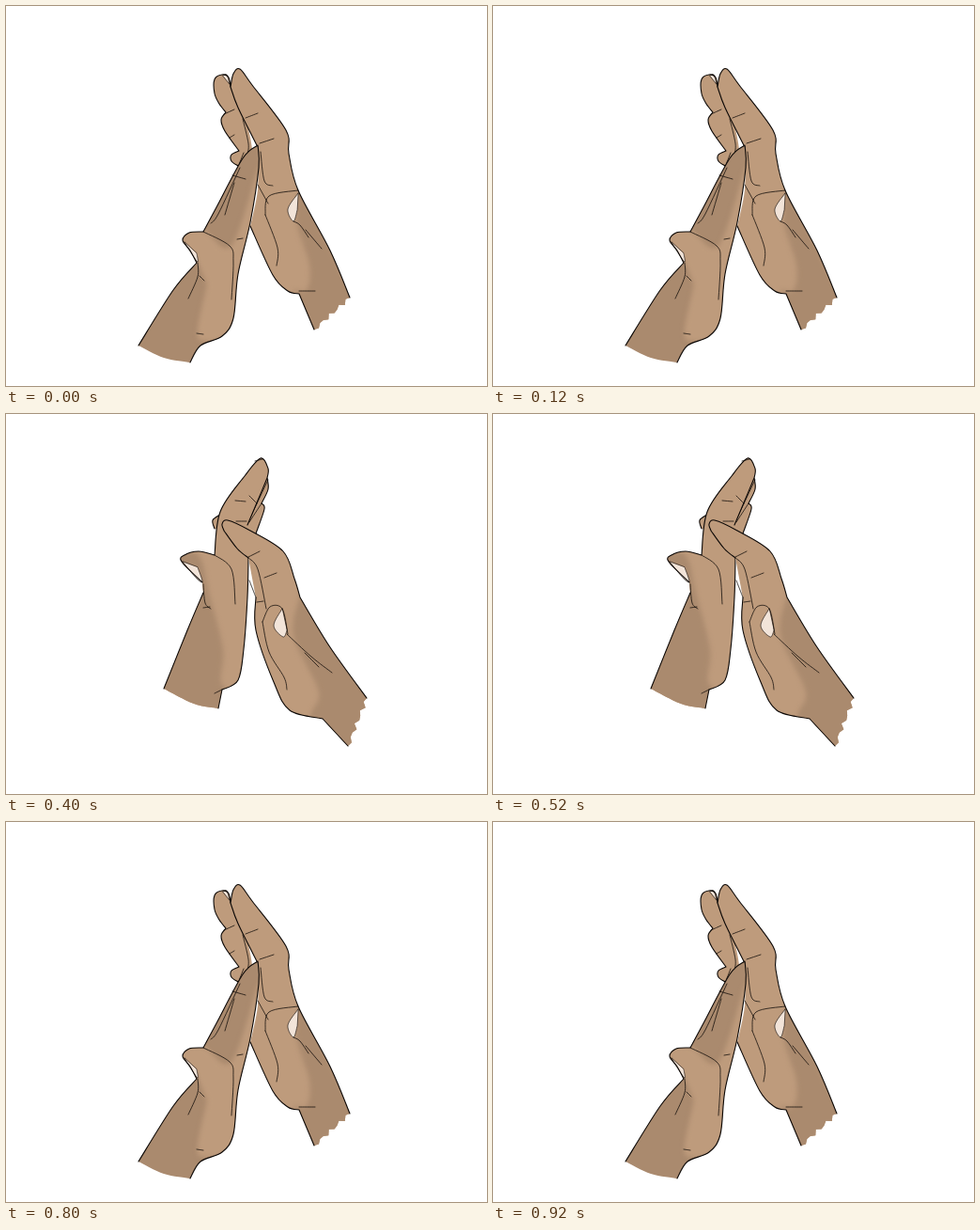
Animation, 512 px wide and 404 px high, one loop 1000 ms. Source, as an HTML page with a canvas:

```html
<!DOCTYPE html>
<html lang="en">
<head>
<meta charset="utf-8">
<title>Clapping hands</title>
<style>
html, body { margin: 0; width: 100%; height: 100%; overflow: hidden; background: #fff }
canvas { display: block; width: 512px; height: 404px }
</style>
</head>
<body>
<canvas width="512" height="404"></canvas>
<script>
const ctx = document.querySelector('canvas').getContext('2d');
const LIGHT = '#be9b7c', DARK = '#aa8a6e', NAIL = '#f2e4d9', INK = '#0c0806';

const points = text => {
  const n = text.match(/\d+/g).map(Number);
  return n.filter((_, i) => i % 2 == 0).map((x, i) => [x, n[2 * i + 1]]);
};

// Smooth curve through the points, continuing the path.
function smooth(path, p) {
  for (let i = 0; i < p.length - 1; i++) {
    const a = p[i - 1] || p[i], b = p[i], c = p[i + 1], d = p[i + 2] || c;
    path.bezierCurveTo(b[0] + (c[0] - a[0]) / 6, b[1] + (c[1] - a[1]) / 6,
      c[0] - (d[0] - b[0]) / 6, c[1] - (d[1] - b[1]) / 6, ...c);
  }
}

function ragged(path, [x, y], [x2, y2]) {
  const dx = x2 - x, dy = y2 - y, len = Math.hypot(dx, dy);
  for (let i = 1; i < 11; i++) {
    const off = 2.5 * Math.sin(i * 2.4);
    path.lineTo(x + dx * i / 11 - dy / len * off, y + dy * i / 11 + dx / len * off);
  }
  path.lineTo(x2, y2);
}

// Runs go on from each other with a corner; "-" is not inked, "~" is a ragged cut.
function outline(text) {
  const fill = new Path2D(), ink = new Path2D();
  let last;
  for (const run of text.split(';')) {
    const p = points(run);
    if (last) p.unshift(last);
    else fill.moveTo(...p[0]);
    if (run.includes('~')) ragged(fill, ...p);
    else {
      smooth(fill, p);
      if (!run.includes('-')) {
        ink.moveTo(...p[0]);
        smooth(ink, p);
      }
    }
    last = p.at(-1);
  }
  fill.closePath();
  return { fill, ink };
}

function strokes(text) {
  const path = new Path2D();
  for (const run of text.split(';')) {
    const p = points(run);
    path.moveTo(...p[0]);
    smooth(path, p);
  }
  return path;
}

const open = [{
  edge: '239 86 237 76 230 73 222 78 222 93 227 104 234 113; 229 121 233 133 248 154; 240 158 240 165 247 170; -262 155 250 100',
  lines: '232 115 243 110; 238 140 243 137; 247 171 253 156',
  nail: '231 74 235 73 238 83'
}, {
  edge: `239 86 242 72 249 67 262 84 298 132 301 157 311 196 345 260 366 310; ~328 344; 312 306;
    300 303 284 286 260 234; -268 195 268 150; 247 108 239 86`,
  shade: '313 190 309 228 323 275 320 302 306 306 328 350 375 320',
  lines: `252 120 258 146 257 158; 270 146 285 141; 255 119 268 114; 271 155 275 186 284 191; 268 190 279 210;
    276 222 280 202 311 196; 276 222 289 257 288 276; 306 229 313 233 322 246; 319 238 336 258; 312 303 329 303`,
  nail: '311 199 300 216 306 229 310 217'
}, {
  edge: `210 240 224 214 252 162 268 148; 269 172 260 230 247 285 242 332 230 351 207 361 196 379;
    -168 374 141 361; 178 302 203 273; 196 260 188 249 195 241 210 240`,
  skin: DARK, tone: LIGHT,
  shade: '205 274 185 247 208 237 240 255 270 170 264 230 248 320 238 350 210 356 204 345 214 296',
  lines: `210 240 238 255 242 272 240 312; 249 172 226 221 218 231; 241 180 255 184; 243 188 233 222;
    204 273 204 288 194 311; 206 287 211 292; 246 248 252 247; 203 348 210 349`,
  nail: '190 251 196 261 204 272 203 263'
}];

const crossed = [{
  edge: '241 77 236 69 226 74 228 87 237 98; 231 102 240 121; -250 122 260 105'
}, {
  edge: `248 111 234 136 218 160; 210 152 195 147 175 153 192 177 195 203; 187 222 142 278; ~184 322;
    204 285 228 275 238 250 246 195 270 138; -289 102; 308 87 311 76 296 76 272 95; -255 100`,
  shade: '165 135 195 145 207 175 212 240 224 290 185 335 125 290',
  lines: `218 160 231 190 229 225 231 236; 195 201 206 202; 231 205 236 203; 231 213 235 212;
    251 158 261 156; 252 161 259 160; 249 172 253 176; 285 94 289 99`,
  nail: '177 159 190 165 193 178'
}, {
  edge: `240 85 242 73 250 71 258 80 296 125 303 165 306 185; 335 236 363 290; ~320 329; 309 300;
    282 292 274 262 265 235; 256 195 262 165 270 140; 262 125 240 85`,
  shade: '308 180 299 230 304 280 300 304 325 340 380 300',
  lines: `256 116 264 118; 270 139 286 134; 258 121 270 139; 270 139 268 170 279 188; 261 168 263 183;
    264 232 274 209 292 204 299 209; 264 232 283 265 284 277; 299 209 304 230 323 255; 309 298 320 300`,
  nail: '298 212 287 231 291 235 298 222'
}];

const raised = [{
  edge: '278 68 279 80 272 95; 275 101 266 127; -222 122; 220 113 228 107',
  lines: '272 95 259 115; 279 70 260 110'
}, {
  edge: `222 150 228 104 254 66 271 47 279 58 278 68; 268 92 257 118; -258 153; 257 195 253 250 247 283 230 293; 226 313;
    -200 308 168 292; 193 230 210 190; -209 179; 187 157 190 150 205 146 222 150`,
  shade: '180 148 205 150 216 190 231 250 229 285 245 300 228 325 155 295',
  lines: `222 150 240 165 244 202; 244 92 255 93; 259 87 267 95; 245 114 256 114; 265 50 273 48;
    210 181 212 201 218 207; 210 206 217 205; 222 297 230 293`,
  nail: '188 157 203 175 209 178 204 163'
}, {
  edge: `232 124 230 117 236 113 260 124 295 146 307 175 313 195; 345 248 384 302; ~364 353; 337 324;
    302 315 285 285 266 230 266 195; -258 153; 246 143 232 124`,
  shade: '315 188 306 220 309 245 333 296 325 326 362 365 405 310',
  lines: `258 153 268 165 277 207; 258 152 270 146; 275 174 288 169; 259 177 266 195; 267 200 274 199;
    273 221 281 205 294 207 300 234; 273 221 280 253 296 280 299 293; 299 234 325 258 347 275; 318 254 333 269`,
  nail: '294 207 285 225 295 237 299 230'
}];

const build = pose => pose.map(({ edge, skin = LIGHT, tone = DARK, shade, lines, nail }) => ({
  ...outline(edge), skin, tone,
  shade: shade && outline(shade).fill,
  lines: lines && strokes(lines),
  nail: nail && outline(nail).fill
}));

function ink(path, width) {
  ctx.lineWidth = width;
  ctx.stroke(path);
}

function draw(part) {
  ctx.fillStyle = part.skin;
  ctx.fill(part.fill);
  if (part.shade) {
    ctx.save();
    ctx.clip(part.fill);
    ctx.filter = 'blur(2.5px)';
    ctx.fillStyle = part.tone;
    ctx.fill(part.shade);
    ctx.restore();
  }
  ctx.strokeStyle = INK;
  ctx.lineCap = ctx.lineJoin = 'round';
  if (part.nail) {
    ctx.fillStyle = NAIL;
    ctx.fill(part.nail);
    ink(part.nail, 0.6);
  }
  ink(part.ink, 1.1);
  if (part.lines) ink(part.lines, 0.75);
}

const [a, b, c] = [open, crossed, raised].map(build);
const poses = [a, b, c, b, a];

let shown;
function tick() {
  const now = poses[Math.floor(performance.now() / 200) % poses.length];
  if (now !== shown) {
    shown = now;
    ctx.clearRect(0, 0, 512, 404);
    now.forEach(draw);
  }
  requestAnimationFrame(tick);
}
tick();
</script>
</body>
</html>
```
